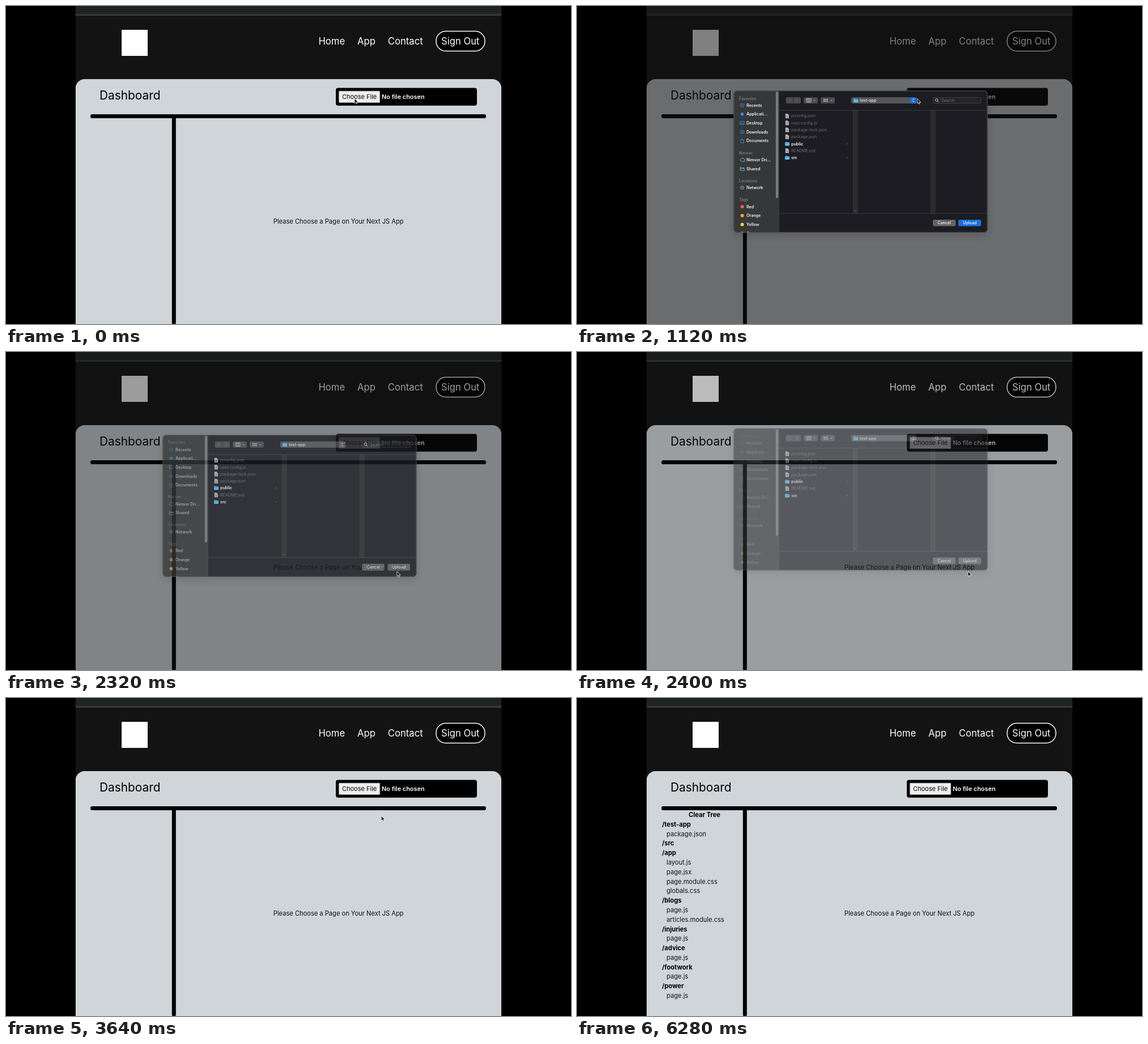
Write an HTML page that moves like this. It is 997 px wide and 561 px high and loops after 6800 ms.

```html
<!DOCTYPE html>
<html lang="en">
<head>
<meta charset="utf-8">
<title>Dashboard upload</title>
<style>
  html, body { margin: 0; width: 100%; height: 100%; overflow: hidden; background: #000; }
  svg { display: block; width: 997px; height: 561px; font-family: Inter, "Open Sans", sans-serif; }
  text { white-space: pre; }
</style>
</head>
<body>
<svg id="stage" viewBox="0 0 997 561" xmlns="http://www.w3.org/2000/svg">
  <defs>
    <clipPath id="pageClip"><rect x="122.7" width="751.5" height="561"/></clipPath>
    <clipPath id="sheetClip"><rect x="276.5" y="149.3" width="448" height="250.5" rx="6"/></clipPath>
    <filter id="shadow" x="-15%" y="-15%" width="130%" height="140%">
      <feDropShadow dx="0" dy="5" stdDeviation="7" flood-opacity=".16"/>
    </filter>
  </defs>
  <g clip-path="url(#pageClip)">
    <rect x="122" width="753" height="561" fill="#131313"/>
    <rect x="122" width="753" height="14.5" fill="#1f2324"/>
    <rect x="122" y="14.3" width="753" height="2.7" fill="#3b3d3e"/>
    <rect x="204" y="42" width="46" height="46" fill="#fff"/>
    <g id="nav"></g>
    <path d="M122.7 561V145a16 16 0 0 1 16-16H858.2a16 16 0 0 1 16 16V561Z" fill="#d0d5d9"/>
    <g id="heading"></g>
    <g id="chooser"></g>
    <g id="building"></g>
    <g id="content">
      <rect x="149" y="191" width="698" height="7" rx="3.3"/>
      <rect x="292.8" y="193" width="7" height="368.5" rx="3"/>
      <g id="tree"></g>
    </g>
    <rect id="dim" x="122" width="753" height="561" fill="#101010"/>
    <g id="sheet">
      <rect x="276.5" y="149.3" width="448" height="250.5" rx="6" fill="#1e1f20" filter="url(#shadow)"/>
      <g clip-path="url(#sheetClip)">
        <rect x="276" y="149" width="81" height="251" fill="#353738"/>
        <g id="sidebar"><g id="favorites"></g><g id="locations"></g><g id="tags"></g></g>
        <rect id="scrollbar" x="350.8" y="151" width="4.4" rx="2.2" fill="#7b7c7d"/>
        <g id="browser"></g>
        <g id="files"></g>
      </g>
      <rect x="277" y="149.8" width="447" height="249.5" rx="5.5" fill="none" stroke="#555758"/>
    </g>
    <g id="prompt"></g>
    <path id="cursor" d="M0 0V8.6L2 6.9 3.3 9.8 4.7 9.2 3.5 6.4H6.1Z" stroke="#fff" stroke-width=".8" stroke-linejoin="round"/>
  </g>
</svg>
<script>
const LOOP = 6800;
const $ = id => document.getElementById(id);

function add(parent, tag, attrs) {
  const node = document.createElementNS("http://www.w3.org/2000/svg", tag);
  for (const key in attrs) node.setAttribute(key, attrs[key]);
  return $(parent).appendChild(node);
}
// Places text by the vertical centre of its capitals.
function label(parent, x, y, size, content, fill = "#000", weight = 400, anchor = "start") {
  const node = add(parent, "text", {
    x, y: y + size * .364, fill, "font-size": size, "font-weight": weight, "text-anchor": anchor
  });
  node.textContent = content;
  return node;
}
const box = (parent, x, y, width, height, rx, fill, more) =>
  add(parent, "rect", { x, y, width, height, rx, fill, ...more });
const line = (parent, d, stroke, width = 1) =>
  add(parent, "path", { d, stroke, "stroke-width": width, fill: "none", "stroke-linejoin": "round" });
const dot = (parent, cx, cy, r, fill, more) => add(parent, "circle", { cx, cy, r, fill, ...more });

function buildPage() {
  [[551.5, "Home"], [620, "App"], [673.8, "Contact"]]
    .forEach(([x, name]) => label("nav", x, 62, 16.65, name, "#fff"));
  box("nav", 759, 44.5, 86, 35, 17, "#000", { stroke: "#fff", "stroke-width": 1.5 });
  label("nav", 801.8, 62, 16.65, "Sign Out", "#fff", 400, "middle");
  label("heading", 165, 157, 20.85, "Dashboard");

  box("chooser", 582, 144.5, 249, 31.3, 4, "#000");
  box("chooser", 587.3, 150, 72.5, 20.5, 1, "#efefef", { stroke: "#777", "stroke-width": .8 });
  label("chooser", 623.6, 160, 11, "Choose File", "#000", 400, "middle");
  label("chooser", 663, 160, 10.9, "No file chosen", "#fff", 600);

  box("building", 751, 144.5, 80, 27.5, 4, "#000");
  label("building", 790.8, 158, 11, "Building Tree", "#fff", 500, "middle");

  label("content", 586.7, 380, 11.12, "Please Choose a Page on Your Next JS App", "#111", 400, "middle");
  label("tree", 225, 206, 11.12, "Clear Tree", "#000", 700, "middle");
  const entries = ("/test-app package.json /src /app layout.js page.jsx page.module.css globals.css " +
    "/blogs page.js articles.module.css /injuries page.js /advice page.js /footwork page.js /power page.js").split(" ");
  entries.forEach((name, i) => {
    const folder = name[0] === "/";
    label("tree", folder ? 150 : 158, 222.8 + i * 16.79, 11.12, name, folder ? "#000" : "#111", folder ? 700 : 400);
  });
}

function folderIcon(parent, x, y) {
  line(parent, `M${x + .6} ${y - 2.4}h2.6l1 1h3.4`, "#4aa9dd", 1.2);
  box(parent, x, y - 2.3, 8, 5.8, 1, "#5ac3f2");
  box(parent, x, y - .9, 8, .6, 0, "#3497cc");
}

function buildSidebar() {
  const blue = "#2f8fee", teal = "#5bc0de";
  const section = (parent, y, name) => label(parent, 286, y, 6.9, name, "#85878a", 500);
  const row = (parent, y, name) => label(parent, 299, y, 7.1, name, "#f4f4f4", 600);

  section("favorites", 163, "Favorites");
  ["Recents", "Applicati...", "Desktop", "Downloads", "Documents"]
    .forEach((name, i) => row("favorites", 175.2 + i * 15.65, name));
  const ring = (parent, y, color) => dot(parent, 291.5, y, 3.2, "none", { stroke: color, "stroke-width": .9 });
  ring("favorites", 175.2, blue);
  line("favorites", "M291.5 173v2.2h-1.8", blue, .8);
  dot("favorites", 291.5, 190.8, 2.8, blue);
  line("favorites", "M288 203.7h7v5.4h-7zM288 207.6h7", blue, .9);
  ring("favorites", 222.1, blue);
  line("favorites", "M291.5 220.2v3.4m-1.4-1.3l1.4 1.4 1.4-1.4", blue, .8);
  line("favorites", "M289 234.6h3l2 2v4.8h-5zM292 234.6v2h2", blue, .9);

  section("favorites", 259, "Nimvor");
  row("favorites", 271.3, "Nimvor Dri...");
  row("favorites", 287, "Shared");
  line("favorites", "M289.5 274a2 2 0 0 1 0-3.8a2.6 2.6 0 0 1 5-.2a2 2 0 0 1 0 4z", teal, .9);
  line("favorites", "M288 284.6h2.6l.8 1h3.8v4.6h-7.2zM288 286.6h7", teal, .9);

  section("locations", 308, "Locations");
  row("locations", 320.5, "Network");
  dot("locations", 291.5, 320.5, 3.1, "#5d5f61", { stroke: "#85878a", "stroke-width": .8 });

  section("tags", 341.5, "Tags");
  [["Red", "#f0655b"], ["Orange", "#f5a623"], ["Yellow", "#f8d93a"], ["Green", "#5bd66b"],
   ["Blue", "#3f8ff5"], ["Purple", "#b878e0"]].forEach(([name, color], i) => {
    const y = 354 + i * 15.7;
    dot("tags", 291.5, y, 3, color);
    row("tags", y, name);
  });
}

function buildBrowser() {
  const chevron = (x, y) => line("browser", `M${x - 1.6} ${y - .7}l1.6 1.6 1.6-1.6`, "#ccc", .9);
  for (const x of [487, 624]) {
    box("browser", x, 184, 8, 182, 0, "#2a2b2c");
    line("browser", `M${x}.5 184v182m7.5 0v-182`, "#38393a", .8);
  }
  line("browser", "M357 184h368M357 366h368", "#3b3c3d");
  line("browser", "M489.8 360v3m1.8-3v3", "#66686a", .7);

  box("browser", 368.5, 161, 26.5, 11, 2.5, "#4a4b4c");
  line("browser", "M381.8 161v11", "#2d2e2f", .8);
  line("browser", "M376.2 164.4l-2 2.1 2 2.1M387.5 164.4l2 2.1-2 2.1", "#77797a", .9);
  for (const x of [400, 430]) {
    box("browser", x, 161, 25, 11, 2.5, "#4a4b4c");
    chevron(x + 19, 166.5);
  }
  line("browser", "M405 163.6h8v5.8h-8zM407.7 163.6v5.8M410.3 163.6v5.8", "#ddd", .8);
  for (let i = 0; i < 6; i++) box("browser", 435 + i % 3 * 2.8, i < 3 ? 164 : 167, 2, 2, 0, "#bbb");

  box("browser", 484, 161, 115, 11, 2.5, "#555759");
  folderIcon("browser", 488, 166.5);
  label("browser", 499, 166.5, 7.2, "test-app", "#eee", 500);
  box("browser", 588, 161, 11, 11, 2.5, "#1a6fdc").id = "stepper";
  line("browser", "M592 165.3l1.5-1.6 1.5 1.6M592 167.7l1.5 1.6 1.5-1.6", "#fff", .9);

  box("browser", 628, 161.3, 85, 10.4, 2.5, "#242526", { stroke: "#48494a", "stroke-width": .8 });
  dot("browser", 634.6, 165.9, 2.3, "none", { stroke: "#ddd", "stroke-width": .9 });
  line("browser", "M636.3 167.7l2 2", "#ddd", .9);
  label("browser", 643, 166.5, 7.1, "Search", "#77797b");

  box("browser", 628, 377, 40, 11.6, 2.5, "#636465");
  label("browser", 648, 382.8, 7.1, "Cancel", "#fff", 500, "middle");
  box("browser", 673, 377, 40, 11.6, 2.5, "#1a6fdc").id = "confirm";
  label("browser", 693, 382.8, 7.1, "Upload", "#fff", 500, "middle");

  ["jsconfig.json", "next.config.js", "package-lock.json", "package.json", "public", "README.md", "src"]
    .forEach((name, i) => {
      const y = 193.8 + i * 12.28;
      if (name.includes(".")) {
        line("files", `M368 ${y - 3.6}h3.6l2.2 2.2v5.4h-5.8z`, "#b5b7b9", .5).setAttribute("class", "document");
        line("files", `M369.6 ${y + .4}h2.6M369.6 ${y + 2}h2.6`, "#555", .6);
        label("files", 378, y, 7.15, name).setAttribute("class", "plain");
      } else {
        folderIcon("files", 367, y);
        label("files", 378, y, 7.15, name, "#fff", 600);
        line("files", `M475.5 ${y - 1.5}l1.5 1.5-1.5 1.5`, "#777", .8);
      }
    });
}

function buildPrompt() {
  box("prompt", 376, 14.5, 250, 83.5, 2, "#292a2d", { stroke: "#3b3c3f", "stroke-width": .7, filter: "url(#shadow)" });
  label("prompt", 384.5, 29.5, 8.05, "Upload 49 files to this site?", "#e8eaed", 600);
  label("prompt", 384.5, 46, 7.25, "This will upload all files from “test-app”. Only do this if you trust", "#9aa0a6");
  label("prompt", 384.5, 57.2, 7.25, "the site.", "#9aa0a6");
  box("prompt", 530, 71.5, 41, 17.5, 2, "none", { stroke: "#3e4145", "stroke-width": .8 });
  label("prompt", 550.4, 80.2, 7, "Cancel", "#8ab4f8", 500, "middle");
  box("prompt", 575.5, 71.3, 41.5, 18, 2, "#8ab4f8");
  label("prompt", 596.2, 80.2, 7, "Upload", "#26334a", 500, "middle");
}

const ramp = (t, from, to) => Math.min(1, Math.max(0, (t - from) / (to - from)));
const smooth = (t, from, to) => { const p = ramp(t, from, to); return p * p * (3 - 2 * p); };
const show = (id, opacity) => {
  $(id).setAttribute("opacity", opacity);
  $(id).setAttribute("display", opacity > 0 ? "inline" : "none");
};
const move = (id, x, y) => $(id).setAttribute("transform", `translate(${x} ${y})`);
const paint = (selector, fill) =>
  document.querySelectorAll(selector).forEach(node => node.setAttribute("fill", fill));

// Each leg: start time, end time, destination.
const cursorLegs = [
  [1055, 1280, 545, 164.5], [1460, 2080, 690, 387], [2410, 3110, 597, 80], [3480, 3960, 846, 568]
];
function cursorAt(t) {
  let x = 615, y = 163;
  for (const [from, to, toX, toY] of cursorLegs) {
    const p = smooth(t, from, to);
    x += (toX - x) * p;
    y += (toY - y) * p;
  }
  return [x, y];
}

function render(t) {
  const closing = t >= 2200;
  const fadeOut = 1 - ramp(t, 2200, 2530) ** 1.5;
  const opened = closing ? fadeOut : smooth(t, 520, 1080);
  show("sheet", opened);
  move("sheet", 0, -64 * (1 - opened) ** 2);
  show("dim", .53 * (closing ? fadeOut : smooth(t, 520, 1100) ** 2));

  const loaded = t >= 1000;
  show("locations", loaded ? 1 : 0);
  move("tags", 0, loaded ? 0 : -33);
  $("scrollbar").setAttribute("height", loaded ? 188 : 211);
  $("sidebar").setAttribute("opacity", closing ? fadeOut ** 2 : 1);
  paint(".plain", loaded ? "#6f7173" : "#fff");
  paint(".document", loaded ? "#b5b7b9" : "#fff");
  paint("#stepper", closing ? "#555759" : "#1a6fdc");
  paint("#confirm", closing ? "#636465" : "#1a6fdc");

  const prompt = smooth(t, 2540, 2720) * (1 - smooth(t, 3390, 3560));
  show("prompt", prompt);
  move("prompt", 0, -4 * (1 - prompt));

  const building = t >= 3760 && t < 4920;
  show("building", building ? 1 : 0);
  show("chooser", building ? 0 : 1);
  show("tree", t >= 3760 ? 1 : 0);
  move("content", 0, building ? -3.6 : 0);

  move("cursor", ...cursorAt(t));
}

buildPage();
buildSidebar();
buildBrowser();
buildPrompt();

const start = performance.now();
function tick() {
  render((performance.now() - start) % LOOP);
  requestAnimationFrame(tick);
}
render(0);
requestAnimationFrame(tick);
</script>
</body>
</html>
```
